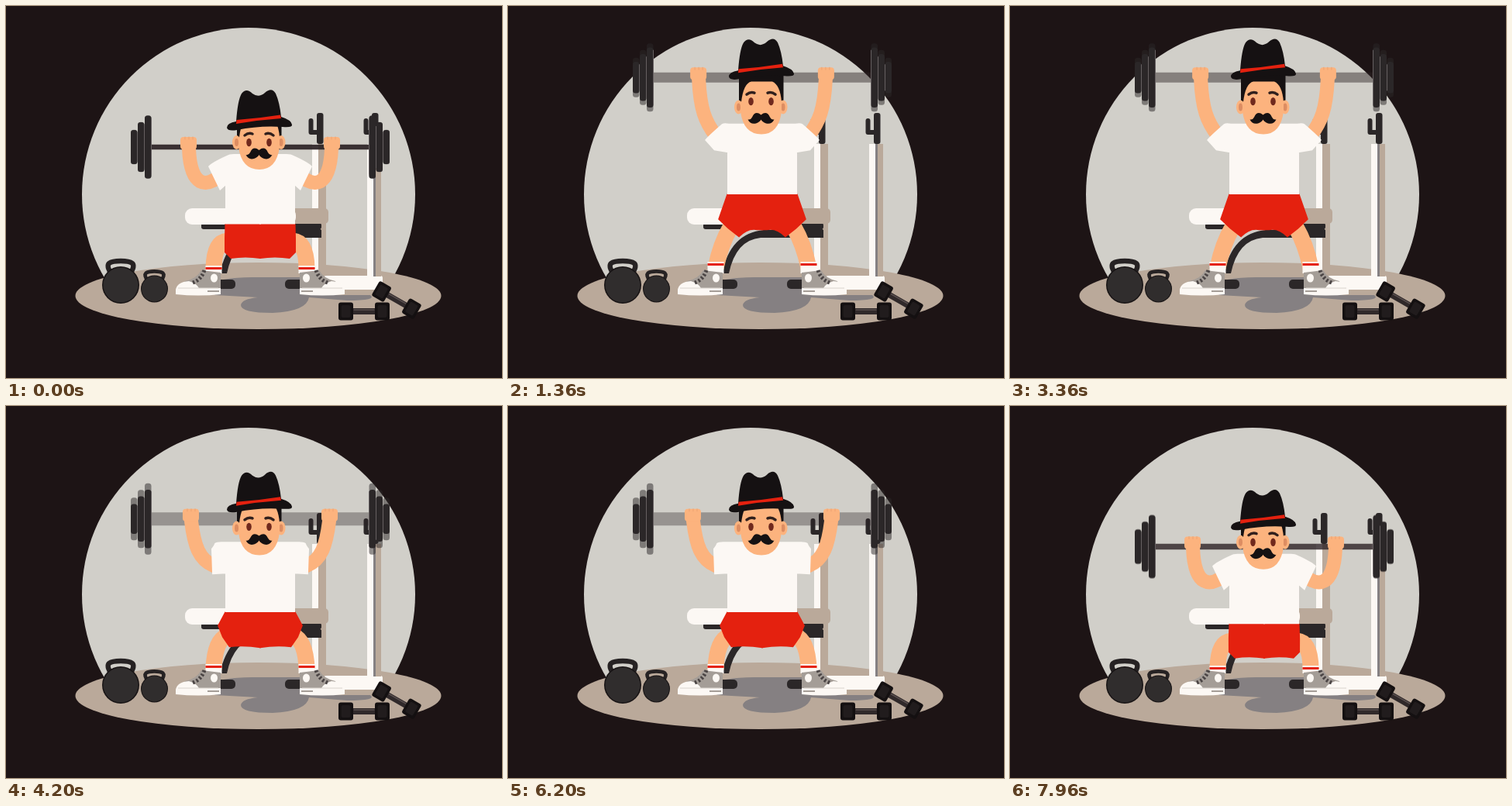
An HTML page with a canvas for the animation above (8 s loop, 640 by 480 pixels).

```html
<!DOCTYPE html>
<html lang="en">
<head>
<meta charset="utf-8">
<title>Shoulder press</title>
<style>
  html, body { margin: 0; width: 100%; height: 100%; overflow: hidden; background: #1d1415; }
  canvas { display: block; }
</style>
</head>
<body>
<canvas id="stage" width="640" height="480"></canvas>
<script>
const ctx = document.getElementById('stage').getContext('2d');
const DARK = '#2b2728', BLACK = '#151112', WHITE = '#fcf8f4', TAN = '#baa99a',
      SKIN = '#fcb37e', RED = '#e4210f', WALL = '#d1cfc9', SHADE = '#858082';
const PERIOD = 2000, STEP = 40;

// Drawing helpers
function fill(path, color) {
  ctx.fillStyle = color;
  ctx.fill(new Path2D(path));
}
function line(path, color, width, cap = 'round') {
  ctx.strokeStyle = color;
  ctx.lineWidth = width;
  ctx.lineCap = cap;
  ctx.lineJoin = 'round';
  ctx.stroke(new Path2D(path));
}
function box(x, y, w, h, color, r = 0) {
  ctx.fillStyle = color;
  ctx.beginPath();
  ctx.roundRect(x, y, w, h, r);
  ctx.fill();
}
function oval(x, y, rx, ry, color) {
  ctx.fillStyle = color;
  ctx.beginPath();
  ctx.ellipse(x, y, rx, ry, 0, 0, 7);
  ctx.fill();
}
function shifted(x, y, angle, draw) {
  ctx.save();
  ctx.translate(x, y);
  ctx.rotate(angle);
  draw();
  ctx.restore();
}
function bothSides(draw) {
  draw();
  ctx.save();
  ctx.translate(656, 0);
  ctx.scale(-1, 1);
  draw();
  ctx.restore();
}

// Motion: quick push up, slower return
const ease = x => (1 - Math.cos(Math.PI * x)) / 2;
function lift(ms) {
  const t = ((ms % PERIOD) + PERIOD) % PERIOD / 1000;
  return t < 1 ? ease(1 - (1 - t) ** 2) : 1 - ease(t - 1);
}
const barHeight = p => 182 - 126 * p;

// Limb poses at rest, leaving rest, nearly up and fully up
const LEVELS = [0, 0.29, 0.7, 1];
const ARM = [
  [236, 184, 238, 234, 258, 236, 280, 216],
  [239, 148, 243, 180, 249, 198, 268, 206],
  [246, 96, 248, 135, 254, 150, 268, 168],
  [249, 60, 250, 95, 256, 125, 268, 150]];
const SLEEVE = [
  [288, 191, 261, 207, 276, 238, 284, 231],
  [272, 175, 265, 184, 266, 217, 284, 216],
  [279, 151, 254, 174, 266, 187, 284, 190],
  [279, 135, 256, 150, 266, 169, 284, 173]];
const SHORTS = [
  [282, 300, 282, 318, 290, 326, 328, 326],
  [273, 283, 279, 298, 288, 311, 328, 312],
  [271, 276, 284, 288, 298, 299, 322, 290],
  [274, 261, 286, 274, 300, 286, 324, 273]];
const LEG = [
  [286, 303, 268, 305, 268, 340],
  [284, 297, 269, 304, 268, 340],
  [287, 286, 274, 308, 268, 338],
  [290, 272, 277, 300, 268, 338]];

function poseAt(p, poses) {
  const i = p < LEVELS[1] ? 0 : p < LEVELS[2] ? 1 : 2;
  const k = (p - LEVELS[i]) / (LEVELS[i + 1] - LEVELS[i]);
  return poses[i].map((v, n) => v + (poses[i + 1][n] - v) * k);
}

function room() {
  box(0, 0, 640, 480, '#1d1415');
  ctx.save();
  ctx.beginPath();
  ctx.rect(0, 0, 640, 374);
  ctx.clip();
  oval(313, 243, 215, 215, WALL);
  ctx.restore();
  oval(325.5, 374, 236, 43, TAN);
  fill('M258 361Q276 350 318 350L408 350Q425 362 408 373L470 373Q480 380 440 380L391 376Q388 394 344 396Q303 396 303 386Q304 378 325 376L270 373Z', SHADE);
}

function rack() {
  box(395, 178, 8, 175, WHITE);
  box(403, 178, 10, 173, TAN);
  box(410, 348, 76, 18, WHITE, 3);
  box(466, 178, 8, 175, WHITE);
  box(474, 178, 3, 171, SHADE);
  box(477, 178, 7, 171, TAN);
  for (const x of [405, 476]) {
    box(x - 4, 138, 8.5, 40, DARK, 3);
    line(`M${x - 11.5} 148V163H${x}`, DARK, 6);
  }
}

function bench() {
  fill('M407 289H330Q287 293 276 345H285Q294 302 326 299H407Z', DARK);
  box(252, 280, 155, 8, DARK, 3);
  box(372, 286, 35, 13, DARK, 5);
  box(340, 261, 76, 20, TAN, 5);
  box(231, 261, 143, 21, WHITE, 9);
  bothSides(() => box(268, 353, 28, 12, DARK, 5));
}

function barbell(y, blur) {
  const height = 6 + blur;
  ctx.globalAlpha = 6 / height;
  box(186, y - height / 2, 286, height, '#2d2426');
  ctx.globalAlpha = 1;
  bothSides(() => {
    [[161, 22], [170, 32], [179, 40.5]].forEach(([x, half]) => {
      ctx.globalAlpha = 0.5;
      box(x, y - half - blur / 2, 8.5, 2 * half + blur, DARK, 3.5);
      ctx.globalAlpha = 1;
      box(x, y - half + blur / 4, 8.5, 2 * half - blur / 2, DARK, 3.5);
      box(x + 8, y - half + 5, 1, 2 * half - 10, '#666061');
    });
  });
}

function shoe() {
  fill('M231 355Q246 352 252 341L277 344V364H228Z', '#a49d97');
  fill('M219 372V366Q221 356 236 355Q246 358 249 364H277V372Q248 375 219 372Z', WHITE);
  line('M260 368H275', '#a49d97', 2, 'butt');
  line('M222 364H274', '#d9d4ce', 1, 'butt');
  ctx.setLineDash([2.5, 2.5]);
  line('M241 357Q252 353 256 341', '#4a4444', 5, 'butt');
  ctx.setLineDash([]);
  oval(268.5, 351, 4.5, 5.5, WHITE);
}

function lowerBody(p) {
  const waist = 281 - 54 * p;
  const sock = 338 - 5 * Math.min(1, p / 0.7);
  const [lx, ly, lcx, lcy, fx, fy] = poseAt(p, LEG);
  const [ax, ay, bx, by, cx, cy, dx, dy] = poseAt(p, SHORTS);
  bothSides(() => {
    line(`M${lx} ${ly}Q${lcx} ${lcy} ${fx} ${fy}`, SKIN, 21, 'butt');
    box(257.5, sock - 3, 21, 348 - sock, WHITE);
    box(257.5, sock - 1, 21, 3, RED);
    shoe();
    fill(`M282.5 ${waist}L${ax} ${ay}L${bx} ${by}L${cx} ${cy}Q${(cx + dx) / 2} ${dy - 3} ${dx} ${dy}H329V${waist}Z`, RED);
  });
}

function upperBody(p) {
  const shoulder = 191 - 55 * p, waist = 281.5 - 54 * p;
  const [hx, hy, ax, ay, bx, by, ex, ey] = poseAt(p, ARM);
  const [sx, sy, tx, ty, ux, uy, vx, vy] = poseAt(p, SLEEVE);
  bothSides(() => {
    line(`M${hx} ${hy}C${ax} ${ay} ${bx} ${by} ${ex} ${ey}`, SKIN, 18);
    fill(`M329 ${shoulder}H${sx + 6}Q${sx} ${sy} ${sx - 3} ${sy + 2}Q${tx + 4} ${ty - 5} ${tx} ${ty}L${ux} ${uy}L${vx} ${vy}H283V${waist}H329Z`, WHITE);
  });
}

function head(p) {
  const chin = 211 - 64 * p;
  const tilt = p * p * (3 - 2 * p);
  const hatShift = -64 * p - 25 * tilt;
  const look = -9 * tilt;
  const brim = 158 + hatShift;

  box(298, brim - 6, 57.5, chin - 40 - brim + 6, BLACK);
  for (const x of [297.5, 355]) {
    oval(x, chin - 35, 5.5, 9, SKIN);
    oval(x, chin - 35, 2.5, 5, '#dd8d62');
  }
  shifted(0, chin, 0, () => {
    fill('M301 -42Q304 -66 314 -68H341Q351 -64 353 -42V-29Q349 0 327 0Q304 0 300 -29Z', SKIN);
    shifted(0, look, 0, () => {
      for (const x of [313.5, 339.5]) {
        oval(x, -35, 3.3, 5.2, '#70291d');
      }
      line('M308 -44Q313 -48 318 -46M335 -46Q340 -48 345 -44', '#31201d', 3.5);
    });
    fill('M326.5 -25Q319 -31 315 -22Q313 -18 309.5 -19Q313 -12 320 -14Q325 -16 326.5 -19Q328 -16 333 -14Q340 -12 343.5 -19Q340 -18 338 -22Q334 -31 326.5 -25Z', BLACK);
  });

  shifted(0, hatShift, 0, () => {
    fill('M285 157Q285 151 297 149Q299 121 304 113Q310 105 318 113Q326 119 334 112Q343 104 348 113Q353 124 355 143Q368 147 369 153Q370 157 357 156Q327 154 298 160Q286 162 285 157Z', BLACK);
    fill('M297.5 147Q326 145 354 140.5L355 145Q326 147 297 152Z', RED);
  });
}

function fists(p) {
  const x = poseAt(p, ARM)[0], y = barHeight(p);
  bothSides(() => {
    box(x - 11, y - 13, 21, 16, SKIN, 4);
    line(`M${x - 5} ${y - 13}v3m5 -3v3m5 -3v3`, '#eca372', 1);
  });
}

function kettlebell(x, y, r) {
  shifted(x, y, 0, () => {
    const s = r / 24;
    ctx.scale(s, s);
    line('M-11 -13Q-19 -24 -15 -28Q-11 -31 0 -31Q11 -31 15 -28Q19 -24 11 -13', '#262223', 6.5);
    oval(0, 0, 24, 24, '#181415');
    oval(0, 0, 22.5, 22.5, '#302d2d');
  });
}

function dumbbell(x, y, angle, scale) {
  shifted(x, y, angle, () => {
    ctx.scale(scale, scale);
    box(-18, -4, 36, 8, '#30292a');
    line('M-13 -2H13', '#5b5150', 1.5);
    for (const side of [-1, 1]) {
      box(side * 23.5 - 9.5, -11.5, 19, 23, '#141011', 3);
      box(side * 23.5 - 6, -8, 12, 16, '#211c1d', 2);
    }
  });
}

function render(ms) {
  const p = lift(ms), y = barHeight(p);
  const blur = Math.abs(y - barHeight(lift(ms - STEP)));
  room();
  rack();
  bench();
  barbell(y, blur);
  lowerBody(p);
  upperBody(p);
  head(p);
  fists(p);
  kettlebell(148, 360, 24);
  kettlebell(191.5, 365, 17.5);
  dumbbell(462, 394, 0, 1);
  dumbbell(504, 379.5, 0.52, 0.95);
}

function tick() {
  render(Math.floor(performance.now() / STEP) * STEP);
  requestAnimationFrame(tick);
}
tick();
</script>
</body>
</html>
```
